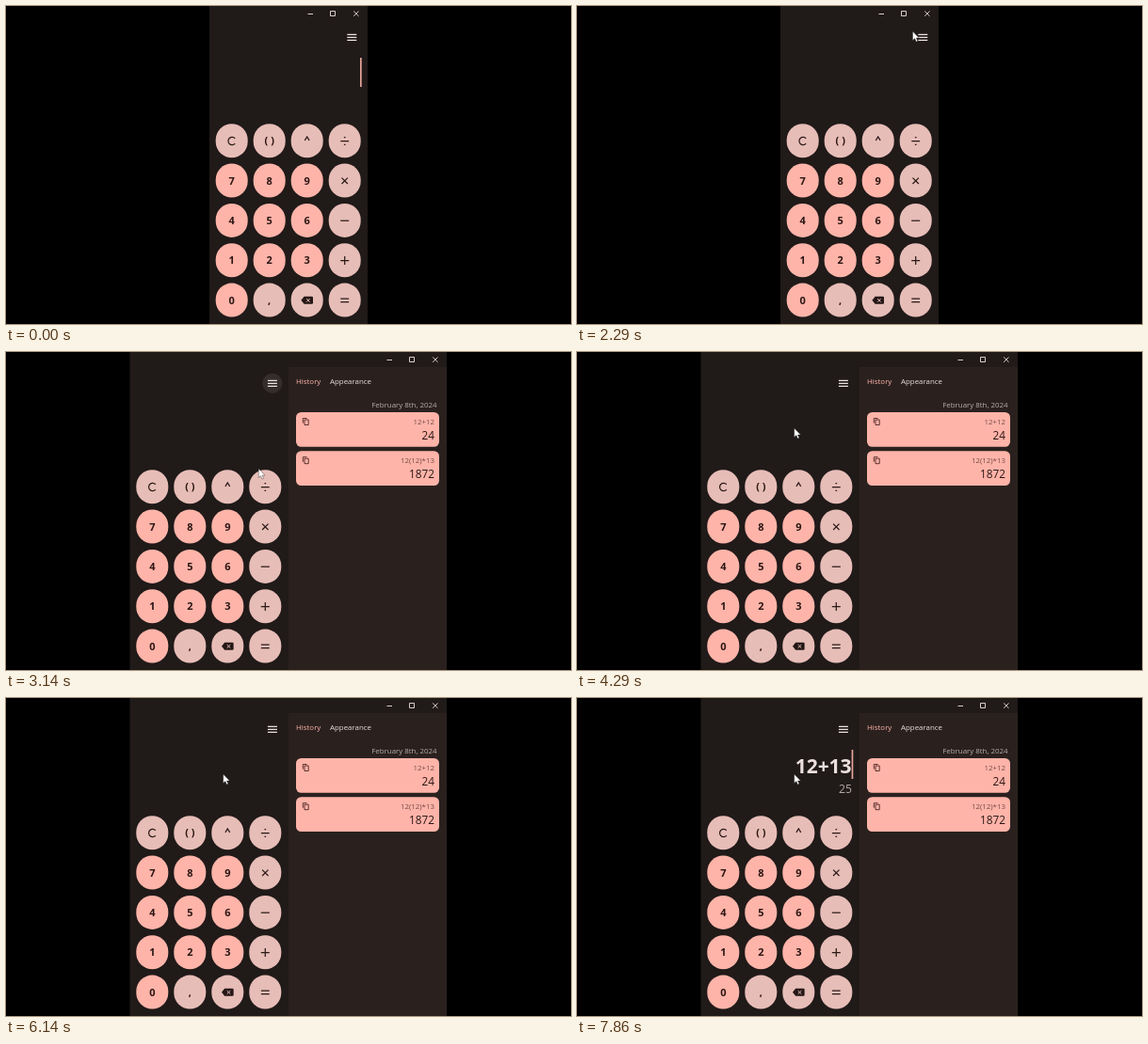
An HTML page that plays this animation: 600x338 px, repeating every 8000 ms.

```html
<!DOCTYPE html>
<html lang="en">
<head>
<meta charset="utf-8">
<title>Calculator</title>
<style>
  html, body { margin: 0; width: 100%; height: 100%; overflow: hidden; background: #000; }
  svg { display: block; width: 100%; height: 100%; }
  text { font: 7.9px "Open Sans", "Noto Sans", sans-serif; fill: #ece0de; }
  .end { text-anchor: end; }
  .key { text-anchor: middle; font-size: 11px; font-weight: 700; fill: #2b1513; }
  .glyph { fill: none; stroke: #2b1a18; stroke-width: 1.25; }
  .line { fill: none; stroke: #ece4e2; }
  .formula { fill: #754a45; }
  .answer { font-size: 11.8px; font-weight: 500; fill: #2b1513; }
</style>
</head>
<body>
<svg viewBox="0 0 600 338">
  <rect id="window" y="0" height="338" fill="#201a19"/>
  <g id="panel">
    <rect x="300" y="16" width="168" height="322" fill="#2a211f"/>
    <text x="308" y="34.3" style="fill:#ffb4a9">History</text>
    <text x="344" y="34.3">Appearance</text>
    <text x="457.5" y="59" class="end" style="fill:#b9adaa">February 8th, 2024</text>
    <g id="cards"></g>
  </g>
  <g id="titleButtons" class="line" stroke-width=".9">
    <path d="M320.5 8.5h5.5M344.5 5.5h5v5h-5zM369.2 5.5l5.3 5.3m0-5.3l-5.3 5.3"/>
  </g>
  <g id="calculator">
    <circle id="hover" cx="367.3" cy="33.3" r="10.6" fill="#352d2c"/>
    <path class="line" stroke-width="1.2" d="M362.3 30.3h10m-10 3h10m-10 3h10"/>
    <text id="entry" x="376" y="80" class="end" style="font-size:21px;font-weight:700"></text>
    <text id="result" x="376.3" y="100.7" class="end" style="font-size:12.2px;fill:#b5aaa8"></text>
    <rect id="caret" x="376" y="55" width="1.7" height="31" fill="#e5a299"/>
    <g id="keys"></g>
  </g>
  <path id="cursor" d="M0 0v9.6l2.2-2 1.5 3.4 1.6-.7-1.5-3.3h3z" fill="#fff" stroke="#222" stroke-width=".4"/>
</svg>
<script>
const el = id => document.getElementById(id);
const PINK = "#ffb4a9", ROSE = "#e7bdb7";

// Operator shapes, relative to the centre of their key
const glyphs = {
  "C": "M3.5-2.4A4.1 4.1 0 1 0 3.5 2.9",
  "^": "M-2.4-.4L0-4.2L2.4-.4",
  "÷": "M-4.4.3h8.8M-.8-3.6h1.6M-.8 4.2h1.6",
  "×": "M-3.2-2.9l6.4 6.4m0-6.4l-6.4 6.4",
  "−": "M-4.5.3h9",
  "+": "M-4.5.3h9M0-4.2v9",
  "=": "M-4.4-1.5h8.8M-4.4 2.1h8.8"
};

function keyFace(label) {
  if (label === "⌫") return `<path d="M-6.3.2l3.2-4h8.2q1.2 0 1.2 1.2v5.6q0 1.2-1.2 1.2h-8.2z" fill="#241715"/>
    <path d="M-.6-1.6l3.6 3.6m0-3.6l-3.6 3.6" stroke="${ROSE}"/>`;
  if (glyphs[label]) return `<path class="glyph" d="${glyphs[label]}"/>`;
  return `<text class="key" y="4.2">${label}</text>`;
}

const rows = [["C", "( )", "^", "÷"], "789×", "456−", "123+", ["0", ",", "⌫", "="]];
el("keys").innerHTML = rows.map((row, r) => [...row].map((label, c) =>
  `<g transform="translate(${239.7 + 40 * c} ${143.2 + 42.35 * r})">
    <rect x="-17" y="-18" width="34" height="36" rx="17" fill="${/\d/.test(label) ? PINK : ROSE}"/>
    ${keyFace(label)}</g>`).join("")).join("");

el("cards").innerHTML = [["12+12", 24], ["12(12)*13", 1872]].map(([formula, answer], i) =>
  `<g transform="translate(308 ${64 + 41.2 * i})">
    <rect width="152" height="36.8" rx="5.5" fill="${PINK}"/>
    <path d="M7.3 11.5v-5h4.2M9 8h4.2v5.5h-4.2z" fill="none" stroke="#4a2522" stroke-width=".9"/>
    <text class="end formula" x="147" y="13.3">${formula}</text>
    <text class="end answer" x="147" y="29.3">${answer}</text></g>`).join("");

// [step, x, y] of the pointer, and [step, entry, result] of the display
const path = [[10, 224, 175], [16, 356.5, 27], [17, 363, 31], [21, 363, 31], [22, 268.3, 124], [28, 230.7, 81]];
const typing = [[0, "", ""], [46, "1", "1"], [47, "12", "12"], [50, "12+", ""], [54, "12+1", "13"], [55, "12+13", "25"]];

function pointerAt(step) {
  const next = path.findIndex(p => p[0] > step);
  if (next < 0) return path.at(-1).slice(1);
  const [a, b] = [path[next - 1], path[next]];
  const u = (step - a[0]) / (b[0] - a[0]), ease = u * u * (3 - 2 * u);
  return [1, 2].map(i => a[i] + (b[i] - a[i]) * ease);
}

const show = (id, on) => el(id).setAttribute("visibility", on ? "visible" : "hidden");
const shift = (id, x, y = 0) => el(id).setAttribute("transform", `translate(${x} ${y})`);

function draw(now) {
  const step = Math.floor((now % 8000) * 7 / 1000 + 0.05) % 56; // seven pictures a second
  const wide = step >= 22;
  el("window").setAttribute("x", wide ? 131.5 : 216);
  el("window").setAttribute("width", wide ? 336.5 : 168);
  shift("calculator", wide ? -84.4 : 0);
  shift("titleButtons", wide ? 84 : 0);
  show("panel", wide);
  show("titleButtons", step !== 21);
  show("hover", step >= 17 && step <= 23);
  show("caret", (step + 3) % 7 < 4);
  const [, entry, result] = typing.findLast(t => t[0] <= step);
  el("entry").textContent = entry;
  el("result").textContent = result;
  const pointing = step >= 10 && step !== 21;
  show("cursor", pointing);
  if (pointing) shift("cursor", ...pointerAt(step));
}

let start;
function tick(now) {
  start ??= now;
  draw(now - start);
  requestAnimationFrame(tick);
}
draw(0);
requestAnimationFrame(tick);
</script>
</body>
</html>
```
